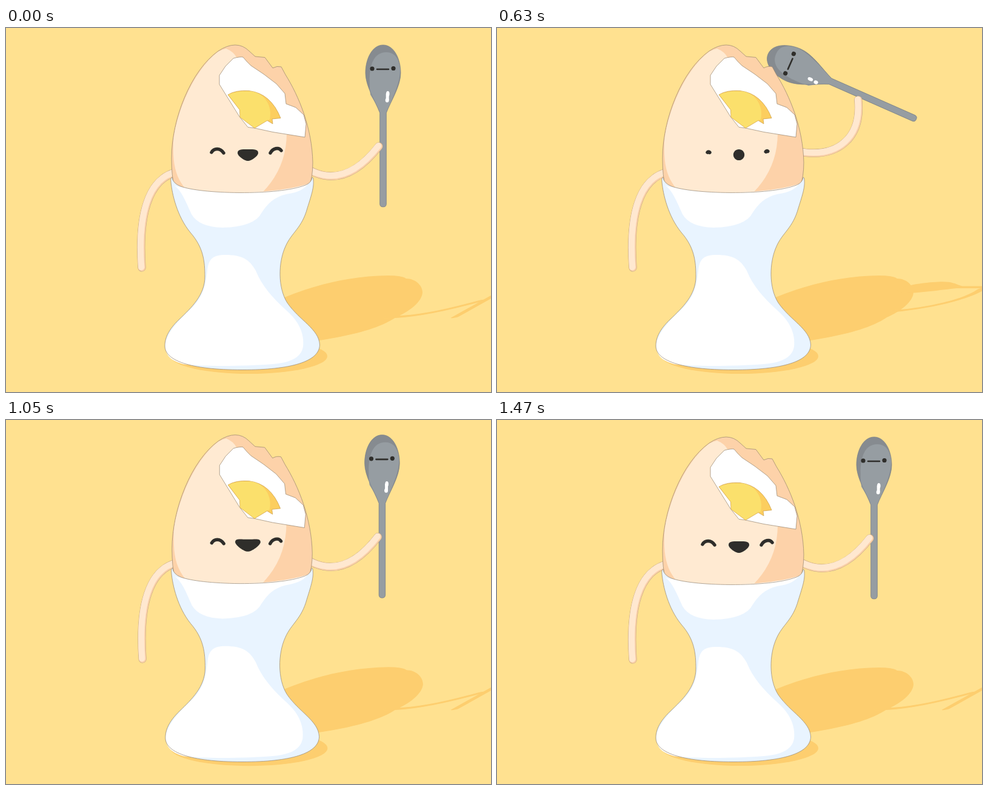
An HTML page for the animation above (1.5 s loop, 800x600 px).

```html
<!DOCTYPE html>
<html lang="en">
<head>
<meta charset="utf-8">
<title>Egg and spoon</title>
<style>
  html, body { margin: 0; height: 100%; overflow: hidden; background: #ffe190; }
  svg { display: block; width: 100%; height: 100%; }
  .line { stroke: #94836c; stroke-width: .7; stroke-linejoin: round; }
  .limb, .ink { fill: none; stroke-linecap: round; }
  .ink { stroke: #2f2e2b; }
  .white { fill: #fff; }
  .shadow { fill: #fdce6f; }
</style>
</head>
<body>
<svg viewBox="0 0 800 600">
  <defs>
    <path id="spoonShape" d="M0-166C18-166 29-143 29-120C29-98 13-74 5.300-54V96Q5.300 101 0 101Q-5.300 101-5.300 96V-54C-13-74-29-98-29-120C-29-143-18-166 0-166Z"/>
    <path id="arm"/>
    <path id="restArm" d="M280 238C234 250 218 310 224 395"/>
    <path id="cupShape" d="M274 246Q271 247 272 254C274 274 282 310 304 337C326 362 328 385 328 410C328 440 306 461 286 480C267 498 262 512 262 524C262 547 300 563.500 390 563.500C470 563.500 517 550 517.500 522C516 496 484 482 464 453C448 428 449 386 461 360C471 337 488 330 497 297C505 272 508 262 507 250Q507 246 505 246Q504 255 494 259C470 268 430 271.500 385 271.500C340 271 305 267 288 261Q275 256 274 246Z"/>
  </defs>

  <g id="ground" class="shadow">
    <ellipse cx="401" cy="541" rx="129" ry="29"/>
    <path d="M440 452C500 426 560 409 630 408Q653 408 660 413C675 413 687 424 687 436C686 452 664 468 643 477C612 498 560 508 517 515L440 540Z"/>
  </g>
  <g class="shadow" transform="matrix(1.145 -.13 -.52 .29 179.200 473.300)">
    <use href="#arm" class="limb" stroke="#fdce6f" stroke-width="13"/>
    <use href="#spoonShape" class="held"/>
  </g>

  <g id="figure">
    <g class="held">
      <use href="#spoonShape" fill="#868b90"/>
      <path fill="#969da2" d="M-21-84C-25-120-21-154 5-154C18-154 24-146 27-134C33-110 13-74 5.300-54V96Q5.300 101 0 101Q-5.300 101-5.300 96V-54C-8-64-15-74-21-84Z"/>
      <use href="#spoonShape" fill="none" stroke="#7b8085" stroke-width=".7"/>
      <circle cx="-18" cy="-127" r="3.600" fill="#2f2e2b"/>
      <circle cx="17" cy="-127.500" r="3.600" fill="#2f2e2b"/>
      <path class="ink" stroke-width="2.600" d="M-10-126H9"/>
      <g id="glint" class="white">
        <ellipse cx=".8" cy="-85.500" rx="2.800" ry="4.500"/>
        <ellipse cx="-.3" cy="-75" rx="3" ry="3.600"/>
        <path id="glintBridge" stroke="#fff" d="M.2-86V-75"/>
      </g>
    </g>

    <g class="limb">
      <g stroke="#bda485" stroke-width="13.200"><use href="#arm"/><use href="#restArm"/></g>
      <g stroke="#fbd0a8" stroke-width="12.200"><use href="#arm"/><use href="#restArm"/></g>
      <g stroke="#ffe8d0" stroke-width="10.200" transform="translate(-.8 -.8)"><use href="#arm"/><use href="#restArm"/></g>
    </g>

    <path fill="#fdd2a9" class="line" d="M378 28Q391 28 401 38L411 47L427 48.500L440 66Q447 62 454 64L461 77C483 112 505 165 506 222Q506 245 500 262Q390 290 278 262Q273 245 273 215C273 150 305 70 350 38Q365 28 378 28Z"/>
    <path fill="#ffead2" d="M363 34Q376 39 381 50L463 170Q464 230 422 272Q340 275 295 264C280 245 275 225 276 190C278 150 306 72 350 39Q357 35 363 34Z"/>
    <path class="white line" d="M375 50Q386 47 391 48L397 55L404 62L425 76L446 92L460 108L462 125L478 131L491 143L495 158L493 180L440 171.500L410 165L399 163.500L385 146L352 93V78L362 63Z"/>
    <g stroke="#c99a43" stroke-width=".7">
      <path fill="#fcce5f" d="M366 110Q379 102 401 103.500Q437 108 453 148.500L439 150L440 158L431 152.500L410 165L386 147L385.500 135Z"/>
      <path fill="#fbe06c" stroke="none" d="M367 110Q380 103 405 104.500C428 108 440 130 435 151L431 152L410 164.500L386.500 147L386 135Z"/>
    </g>

    <path id="leftEye" class="ink"/>
    <path id="rightEye" class="ink"/>
    <path id="mouth" fill="#2f2e2b"/>

    <use href="#cupShape" fill="#e9f4ff"/>
    <path class="white" d="M275 257Q280 262 288 262C330 274 440 276 498 257Q490 270 462 274C442 279 432 289 422 304Q410 328 357 329Q318 328 306 307C296 285 290 268 275 257Z"/>
    <path class="white" d="M332 400C334 380 342 374 362 374C390 374 402 382 412 400C422 425 440 445 462 465C485 485 492 505 490 525C487 545 465 552 440 554C390 558 320 558 292 554C270 548 262.500 538 262.500 522C264 504 286 480 306 462C325 443 329 425 332 400Z"/>
    <use href="#cupShape" class="line" fill="none"/>
  </g>
</svg>

<script>
const LOOP = 1500;
const el = id => document.getElementById(id);
const heldParts = document.querySelectorAll('.held');

// Blend two paths that share the same commands.
function mix(a, b, k) {
  const goal = b.match(/-?[\d.]+/g);
  let i = 0;
  return a.replace(/-?[\d.]+/g, n => +n + (goal[i++] - n) * k);
}

// Keys are [time, value] pairs, joined by sine easing.
function track(t, keys) {
  const next = keys.findIndex(key => key[0] > t);
  if (next < 0) return keys[keys.length - 1][1];
  if (next === 0) return keys[0][1];
  const [t0, v0] = keys[next - 1], [t1, v1] = keys[next];
  return v0 + (v1 - v0) * (1 - Math.cos(Math.PI * (t - t0) / (t1 - t0))) / 2;
}

const swing = [[0, 0], [655, 66.4], [880, 0]];
const surprise = [[0, 0], [240, 1], [600, 1], [720, 0]];
const grin = [[620, 0], [780, 1], [1070, 1], [1200, 0]];
const bounce = [[620, 0], [840, 1.05], [1000, .95], [1050, .85], [1230, -1], [1470, 0]];

const smile = 'M399 200C410 200 416 200 416 206C416 211 405 219 399 219C393 219 382 211 382 206C382 200 388 200 399 200Z';
const wideSmile = 'M399 199C414 199 420 197 420 204C419 209 406 219 399 219C392 219 379 209 378 204C378 197 384 199 399 199Z';
const gasp = 'M399 200C404 200 408 204 408 209C408 214 404 218 399 218C394 218 390 214 390 209C390 204 394 200 399 200Z';

const armLow = 'M500 234C542 257 580 240 ';
const armHigh = 'M505 205C562 213 602 182 ';

function drawEye(id, happy, dot, k) {
  el(id).setAttribute('d', mix(happy, dot, k));
  el(id).setAttribute('stroke-width', 5.4 + .5 * k);
}

function draw(t) {
  const angle = track(t, swing), open = track(t, surprise), stretch = track(t, bounce);

  const gripX = 622 - .345 * angle, gripY = 194 - 1.42 * angle + .0022 * angle ** 2;
  for (const part of heldParts)
    part.setAttribute('transform', `translate(${gripX} ${gripY}) rotate(${-angle})`);
  el('glint').setAttribute('transform', `translate(${7 - .27 * angle})`);
  el('glintBridge').setAttribute('stroke-width', Math.max(0, 5 - angle * .08));

  const hand = `${615 - .29 * angle} ${195 - 1.36 * angle + .0031 * angle ** 2}`;
  el('arm').setAttribute('d', mix(armLow + hand, armHigh + hand, angle / 66));

  drawEye('leftEye', 'M339 205C343 198 353 197 359 206', 'M348.8 205C349 205 349 205 349.2 205', open);
  drawEye('rightEye', 'M436 206C440 198 450 196 454 202', 'M444.8 203.5C445 203.5 445 203.5 445.2 203.5', open);
  el('mouth').setAttribute('d', mix(mix(smile, wideSmile, track(t, grin)), gasp, 1 - (1 - open) ** 2));

  el('figure').setAttribute('transform',
    `translate(390 564) scale(${1 - .008 * stretch} ${1 + .0075 * stretch}) translate(-390 -564)`);
  el('ground').setAttribute('transform',
    `translate(390 540) scale(${1 + .0035 * stretch} ${1 + .007 * stretch}) translate(-390 -540)`);
}

function tick() {
  draw(performance.now() % LOOP);
  requestAnimationFrame(tick);
}
tick();
</script>
</body>
</html>
```
